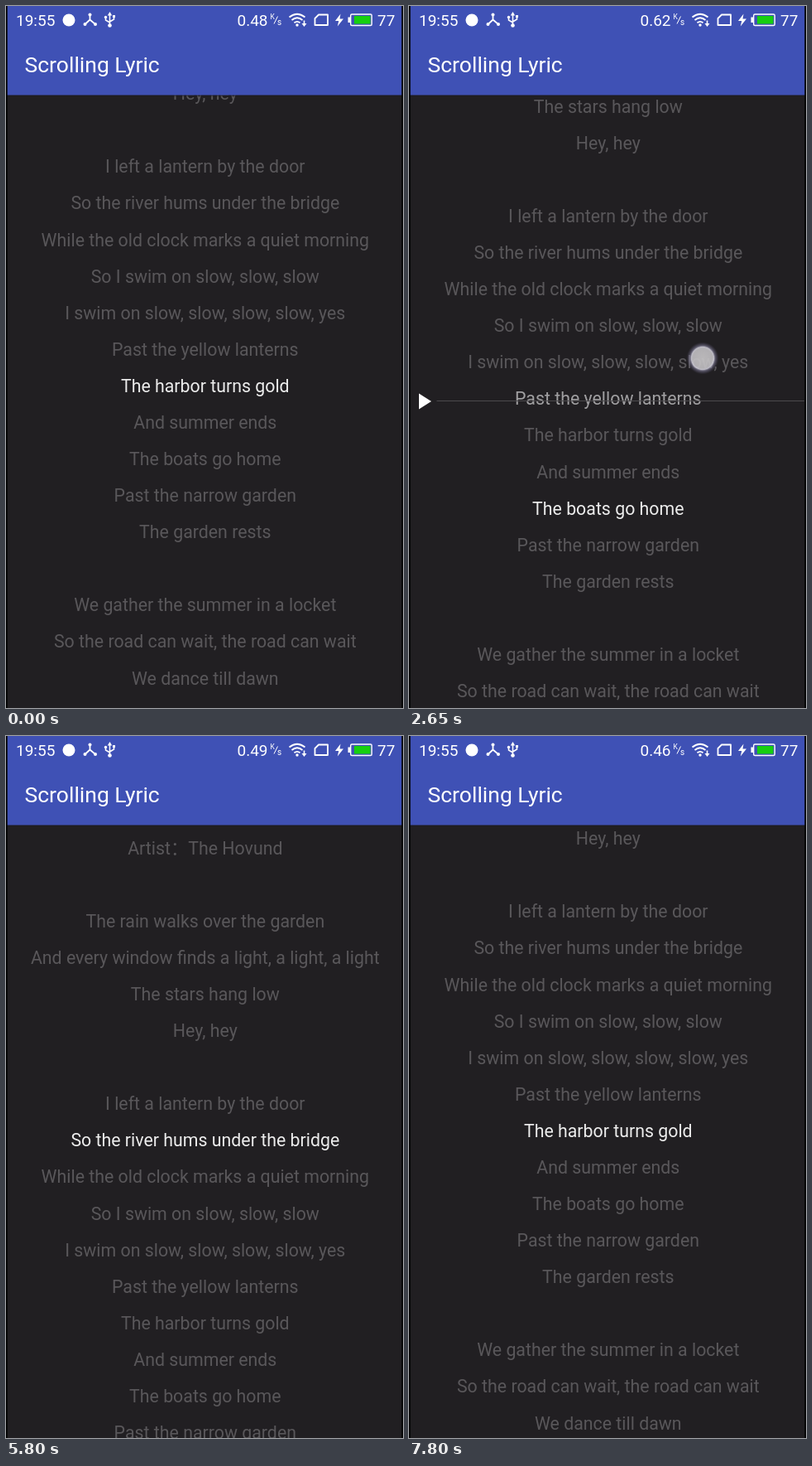
An HTML page that plays this animation: 480 px wide and 847 px high, repeating every 7.85 s.

```html
<!DOCTYPE html>
<html lang="en">
<head>
<meta charset="utf-8">
<title>Scrolling Lyric</title>
<style>
  html, body { margin: 0; width: 100%; height: 100%; overflow: hidden; background: #000; }
  svg { display: block; width: 100vw; height: 100vh; font-family: Roboto, "Noto Sans CJK SC", sans-serif; }
  #lyrics { font-size: 21.33px; text-anchor: middle; fill: #59575a; }
  #lyrics .near { fill: #a09fa1; }
  #lyrics .now { fill: #ececec; }
  .status { font-size: 19px; }
  .line { fill: none; stroke: #fff; stroke-width: 1.8; }
</style>
</head>
<body>
<svg viewBox="0 0 480 847">
  <defs>
    <radialGradient id="glow">
      <stop offset="0" stop-color="#c6c4c6" stop-opacity=".92"/>
      <stop offset=".6" stop-color="#c2c0c3" stop-opacity=".9"/>
      <stop offset=".7" stop-color="#d2d0da" stop-opacity=".88"/>
      <stop offset=".78" stop-color="#8f8ba8" stop-opacity=".55"/>
      <stop offset="1" stop-color="#5a5578" stop-opacity="0"/>
    </radialGradient>
  </defs>
  <rect width="480" height="847" fill="#211f22"/>
  <g id="lyrics"></g>
  <g id="marker">
    <path d="M12 467.5L27 477L12 486.5Z" fill="#fff"/>
    <path d="M33.500 476.500H478" stroke="#4b494c"/>
  </g>
  <path d="M0 108H480" stroke="#1a191e"/>
  <rect width="480" height="107.500" fill="#3f51b5"/>
  <g fill="#fff">
    <text x="22.500" y="80" font-size="26.500">Scrolling Lyric</text>
    <g class="status">
      <text x="12" y="23.500">19:55</text>
      <text id="speed" x="279.500" y="23.500"></text>
      <text x="449" y="23.500">77</text>
    </g>
    <text x="319.500" y="16" font-size="8.500">K</text>
    <text x="328" y="22.500" font-size="10">s</text>
    <path class="line" style="stroke-width:1" d="M324 21.500L328.500 12.500"/>
    <circle cx="76" cy="17" r="7.500"/>
    <path class="line" d="M101.500 10V16.500M101.500 16.500L95 22.500M101.500 16.500L108.500 22.500"/>
    <circle cx="101.500" cy="10.500" r="2"/><circle cx="95.500" cy="22" r="2"/><circle cx="108" cy="22" r="2"/>
    <path class="line" style="stroke-width:1.500" d="M125.500 10V23M120.500 14V17L125.500 20M130.500 13V16L125.500 19"/>
    <path d="M122.800 11.500L125.500 7L128.200 11.500Z"/>
    <circle cx="125.500" cy="23.500" r="2.300"/><circle cx="120.500" cy="13.500" r="1.700"/>
    <path d="M129 11H132V14H129Z"/>
    <path class="line" d="M342.500 13.500Q352 6 361.500 13.500M345.500 17Q352 11.500 358.500 17M348.500 20.300Q352 17.500 355.500 20.300"/>
    <circle cx="352" cy="23" r="1.700"/>
    <path d="M357.500 21H363.500L360.500 25Z"/><path d="M359.700 17.500H361.300V22H359.700Z"/>
    <path class="line" d="M378 10.500H389V23H373.500V15Z" stroke-linejoin="round"/>
    <path d="M404.500 9.500L398 18H402.300L400.800 24.500L408 15.500H403.500Z"/>
    <rect class="line" style="stroke-width:1.400" x="416.700" y="10" width="25.500" height="13.500" rx="1.500"/>
    <rect x="413.500" y="13.500" width="2.500" height="6.500"/>
    <rect x="421" y="12" width="19.500" height="9.500" fill="#17cf10"/>
  </g>
  <circle id="finger" r="19.500" fill="url(#glow)"/>
  <path d="M0 0H1.700V847H0ZM478.300 0H480V847H478.300Z"/>
</svg>
<script>
const LOOP = 7850, TICK = 50, GAP = 44.08, REST = 458.3, MID = 477;
const $ = id => document.getElementById(id);

const lines = [
  "Paper Sky (Ten Shores Of Rain)", "Artist：The Hovund", "",
  "The rain walks over the garden",
  "And every window finds a light, a light, a light",
  "The stars hang low", "Hey, hey", "",
  "I left a lantern by the door",
  "So the river hums under the bridge",
  "While the old clock marks a quiet morning",
  "So I swim on slow, slow, slow",
  "I swim on slow, slow, slow, slow, yes",
  "Past the yellow lanterns",
  "The harbor turns gold", "And summer ends", "The boats go home",
  "Past the narrow garden", "The garden rests", "",
  "We gather the summer in a locket",
  "So the road can wait, the road can wait",
  "We dance till dawn", "Hey, hey",
  "Every harbor has its own moon"
];
const rows = lines.map((words, i) => {
  const row = document.createElementNS("http://www.w3.org/2000/svg", "text");
  row.setAttribute("x", 240.8);
  row.setAttribute("y", i * GAP + 7.6);
  row.textContent = words;
  return $("lyrics").appendChild(row);
});

// Height of the first line when the given line stands at y
const offset = (line, y = REST) => y - line * GAP;
const DRAG_DOWN = offset(16, 606), DRAG_UP = offset(9, 228.8);
const scrollKeys = [
  [200, offset(14)], [600, offset(15)], [1700, offset(15)], [2050, offset(16)], [2150, offset(16)],
  [2500, DRAG_DOWN], [2650, DRAG_DOWN], [3000, offset(16, 720)], [3150, offset(16, 720)],
  [3550, offset(8, 491.7)], [5650, offset(8, 491.7)], [5910, offset(9)], [5950, offset(9)],
  [6700, DRAG_UP], [6850, DRAG_UP], [7250, offset(9, 242)], [7600, offset(14, 476.3)]
];
const playing = [[0, 14], [250, 15], [1750, 16], [3750, 8], [5700, 9], [7700, 14]];
const speeds = [[0, "0.48"], [300, "0.53"], [800, "0.35"], [1300, "0.28"], [2650, "0.62"],
  [3300, "0.47"], [5350, "0.49"], [7000, "0.46"]];

const within = (t, from, to) => t >= from && t < to;
const latest = (list, t) => list.filter(([from]) => from <= t).pop()[1];

function scrollAt(t) {
  const next = scrollKeys.findIndex(([at]) => at > t);
  if (next < 0) return scrollKeys[scrollKeys.length - 1][1];
  if (next === 0) return scrollKeys[0][1];
  const [t0, a] = scrollKeys[next - 1], [t1, b] = scrollKeys[next];
  return a + (b - a) * (1 - Math.cos(Math.PI * (t - t0) / (t1 - t0))) / 2;
}

function fingerAt(t, y) {
  if (within(t, 2100, 3600)) return [355, 425 + y - DRAG_DOWN];
  if (within(t, 5950, 7300)) return [372, 251 + y - DRAG_UP];
  if (within(t, 3650, 3800)) return [28, 478];
  if (within(t, 7650, 7800)) return [26, 478];
}

function draw(t) {
  const y = scrollAt(t), now = latest(playing, t), finger = fingerAt(t, y);
  const dragging = within(t, 2150, 3750) || within(t, 5950, 7700);
  const near = dragging ? Math.round((MID - y) / GAP) : -1;
  $("lyrics").setAttribute("transform", `translate(0 ${y})`);
  rows.forEach((row, i) => row.setAttribute("class", i === now ? "now" : i === near ? "near" : ""));
  $("marker").style.display = dragging ? "" : "none";
  $("finger").style.display = finger ? "" : "none";
  if (finger) $("finger").setAttribute("transform", `translate(${finger})`);
  $("speed").textContent = latest(speeds, t);
}

const start = performance.now();
function frame() {
  const t = (performance.now() - start) % LOOP;
  draw(Math.floor(t / TICK) * TICK);
  requestAnimationFrame(frame);
}
frame();
</script>
</body>
</html>
```
